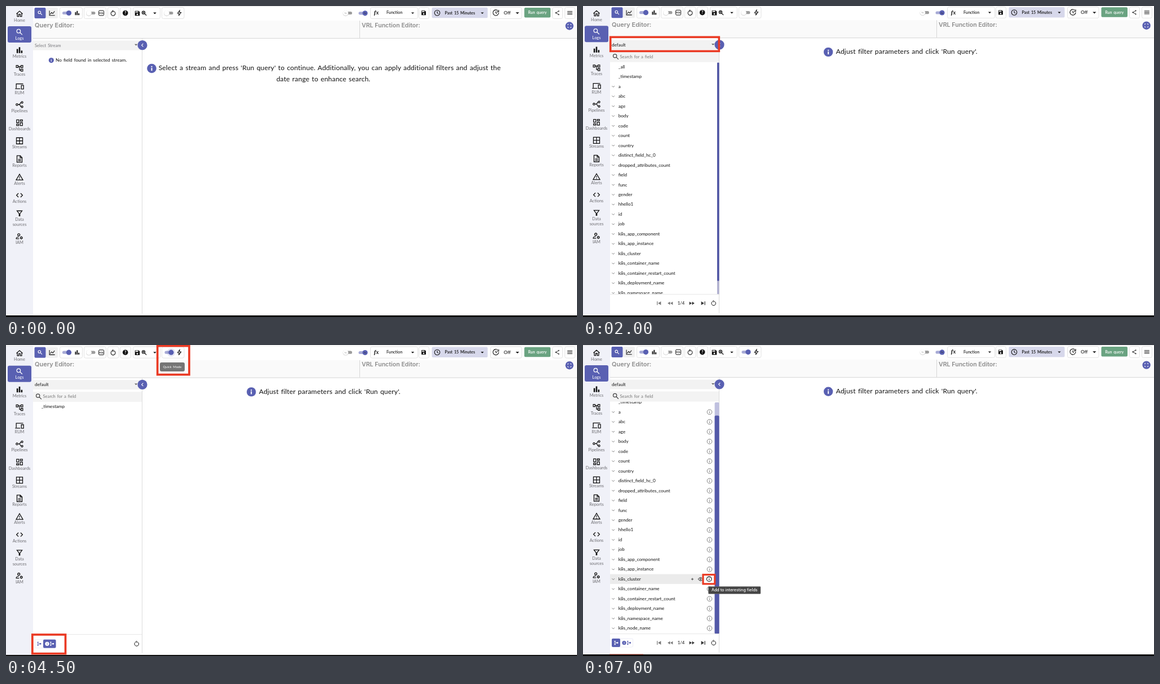
Recreate the animation shown at these times as an HTML page. Size 1013 px wide and 553 px high, loop 8000 ms.

```html
<!DOCTYPE html>
<html lang="en">
<head>
<meta charset="utf-8">
<title>Log search</title>
<style>
html, body { margin: 0; width: 100%; height: 100%; overflow: hidden; background: #fff; }
svg { display: block; width: 1013px; height: 553px; font-family: Lato, "Noto Sans", sans-serif; word-spacing: .06em; }
#page { animation: nudge 8s step-end infinite; }
.bar { animation: bar 8s step-end infinite; }
.empty { animation: empty 8s step-end infinite; }
.ready { animation: ready 8s step-end infinite; }
.stream { animation: stream 8s step-end infinite; }
.quick { animation: quick 8s step-end infinite; }
.fields { animation: fields 8s step-end infinite; }
.off { animation: off 8s step-end infinite; }
.on { animation: on 8s step-end infinite; }
@keyframes nudge {
  0% { transform: translateY(0); }
  6.25% { transform: translateY(-.8px); }
  37.5% { transform: translateY(.7px); }
  68.75%, 100% { transform: translateY(.1px); }
}
@keyframes bar { 0%, 68.75%, 100% { transform: none; } 37.5% { transform: translateY(.8px); } }
@keyframes empty { 0% { visibility: visible; } 6.25%, 100% { visibility: hidden; } }
@keyframes ready { 0% { visibility: hidden; } 6.25%, 100% { visibility: visible; } }
@keyframes stream { 0%, 37.5%, 100% { visibility: hidden; } 6.25% { visibility: visible; } }
@keyframes quick { 0%, 68.75%, 100% { visibility: hidden; } 37.5% { visibility: visible; } }
@keyframes fields { 0% { visibility: hidden; } 68.75%, 100% { visibility: visible; } }
@keyframes off { 0% { visibility: visible; } 37.5%, 100% { visibility: hidden; } }
@keyframes on { 0% { visibility: hidden; } 37.5%, 100% { visibility: visible; } }
</style>
</head>
<body>
<svg id="stage" viewBox="0 0 1013 553">
  <defs><clipPath id="listClip"><rect x="48" y="101" width="193" height="412"/></clipPath></defs>
  <g id="page"></g>
  <g id="marks"></g>
</svg>
<script>
const BLUE = '#5960b2', RED = '#ea3a24', INK = '#111', GREY = '#77777c', LINE = '#dcdcdc';
const page = document.getElementById('page'), marks = document.getElementById('marks');
let layer = page;

function el(tag, attrs, text) {
  const node = document.createElementNS('http://www.w3.org/2000/svg', tag);
  for (const k in attrs) node.setAttribute(k, attrs[k]);
  if (text) node.textContent = text;
  return layer.appendChild(node);
}
function group(attrs, draw) {
  const outer = layer;
  layer = el('g', attrs);
  draw();
  layer = outer;
}
const scene = (name, draw) => group({ class: name }, draw);
const box = (x, y, w, h, fill, rx = 0, more = {}) => el('rect', { x, y, width: w, height: h, fill, rx, ...more });
const frame = (x, y, w, h, stroke, sw, rx = 0) => box(x, y, w, h, 'none', rx, { stroke, 'stroke-width': sw });
const dot = (cx, cy, r, fill, more = {}) => el('circle', { cx, cy, r, fill, ...more });
const path = (d, fill, more = {}) => el('path', { d, fill, ...more });
// y is the middle of the line
const text = (x, y, s, size, fill = INK, more = {}) =>
  el('text', { x, y: y + size * .34, 'font-size': size, fill, ...more }, s);
const mid = { 'text-anchor': 'middle' };
const ring = (x, y, r) => `M${x - r} ${y}a${r} ${r} 0 1 1 ${2 * r} 0a${r} ${r} 0 1 1 ${-2 * r} 0`;

const lens = ring(9.5, 9.5, 5) + 'M13.5 13.5L19.5 19.5';
const lines = {
  home: 'M3.5 12L12 4.4l8.5 7.6M6 10.5V19h4v-6h4v6h4v-8.5',
  search: lens,
  zoom: lens + 'M9.5 7v5M7 9.5h5',
  tree: 'M3 4h5v6H3zM16 4h5v6h-5zM16 14h5v6h-5zM8 7h8M12 7v10h4',
  devices: 'M3 17V5h19M0 18.5h14M17 9h6v10h-6z',
  pipe: ring(5, 12, 2.6) + ring(19, 6, 2.4) + ring(19, 18, 2.4) + 'M8 12h3q2 0 3-3t3-3M11 12q2 0 3 3t3 3',
  tiles: 'M4 4h6v8H4zM14 4h6v4h-6zM14 12h6v8h-6zM4 16h6v4H4z',
  grid: 'M3.5 3.5h17v17h-17zM12 3v18M3 12h18',
  doc: 'M5 3h9l5 5v13H5zM13.5 3v5.5H19M8 13h8M8 17h8',
  alert: 'M12 4L21.3 20H2.7zM12 10v4M12 16v2',
  code: 'M9 6.7L3.7 12L9 17.3M15 6.7L20.3 12L15 17.3',
  funnel: 'M5 5h14l-6 8v6h-2v-6z',
  user: ring(10, 8, 3) + 'M11 19H3v-1c0-2.5 4-4 7-4' + ring(17, 16.5, 2.5) + 'M17 12.5v1.5M17 19v2M13.5 14.5l1.5 1M19 17.5l1.5 1M20.5 14.5l-1.5 1M15 17.5l-1.5 1',
  chart: 'M3.5 4v16H22M6 16l5-6l4 4l6-8',
  reset: 'M8 6.2A7.5 7.5 0 1 0 12 5M12.5 1.5L9 5l3.5 3.5',
  bolt: 'M13 3L6 13h5l-1 8l8-11h-5z',
  clock: ring(12, 12, 8.8) + 'M12 6.5v5.5l4 2.5',
  update: 'M18.5 5.6A9 9 0 1 0 21 12M21 3v6h-6M12 7.5v5l3.5 2',
  share: 'M18 5L6 12l12 7' + ring(18, 5, 1.5) + ring(6, 12, 1.5) + ring(18, 19, 1.5),
  menu: 'M3 7h18M3 12h18M3 17h18',
  full: 'M5 9V5h4M15 5h4v4M19 15v4h-4M9 19H5v-4',
  bars: 'M6 9v11M12 4v16M18 13v7',
  info: ring(12, 12, 9) + 'M12 7v2M12 11v6',
  eye: 'M2 12q10-14 20 0q-10 14-20 0' + ring(12, 12, 2.5),
  plus: 'M12 6v12M6 12h12',
  down: 'M6 9l6 6l6-6',
  left: 'M15 6l-6 6l6 6'
};
const solids = {
  save: 'M3 3h14l4 4v14H3zM5 5v4h10V5z' + ring(12, 16, 3),
  first: 'M4 5h2.5v14H4zM19 5v14L8 12z',
  last: 'M20 5h-2.5v14H20zM5 5v14l11-7z',
  back: 'M11 6v12l-9-6zM21 6v12l-9-6z',
  next: 'M13 6v12l9-6zM3 6v12l9-6z',
  caret: 'M5 9h14l-7 7z',
  schema: 'M3 2h6v5H3zM3 9.5h6v5H3zM3 17h6v5H3zM14 8.5h8v7h-8zM5 7h2v10H5zM9 11h5v2H9z'
};
function icon(name, x, y, size, color = INK, sw = 2) {
  const k = size / 24, transform = `translate(${x - size / 2} ${y - size / 2}) scale(${k})`;
  if (solids[name]) path(solids[name], color, { transform, 'fill-rule': 'evenodd' });
  else path(lines[name], 'none', { transform, stroke: color, 'stroke-width': sw });
}
function toggle(x, y, on, mark) {
  box(x, y - 2.6, 15, 5.2, on ? '#a8abd6' : '#9c9c9c', 2.6);
  const cx = on ? x + 11.5 : x + 3.5;
  if (!on) dot(cx, y + .5, 4.9, '#ccc');
  dot(cx, y, 4.6, on ? BLUE : '#fff');
  if (mark) text(cx, y, mark, 4.5, on ? '#222' : '#999', mid);
}
function infoDot(x, y, r) {
  dot(x, y, r, BLUE);
  box(x - r * .12, y - r * .5, r * .24, r * .24, '#fff');
  box(x - r * .12, y - r * .12, r * .24, r * .62, '#fff');
}

// Side menu
box(0, 0, 48, 553, '#f0f1f8');
box(3, 36, 42, 29, BLUE, 3);
[['home', 'Home'], ['search', 'Logs'], ['bars', 'Metrics'], ['tree', 'Traces'], ['devices', 'RUM'],
 ['pipe', 'Pipelines'], ['tiles', 'Dashboards'], ['grid', 'Streams'], ['doc', 'Reports'], ['alert', 'Alerts'],
 ['code', 'Actions'], ['funnel', 'Data|sources'], ['user', 'IAM']].forEach(([pic, label], i) => {
  const y = 14 + 32.25 * i + (i > 11 ? 8.3 : 0), active = i === 1;
  icon(pic, 24, y, 15.5, active ? '#fff' : INK, pic === 'bars' ? 4 : 2);
  label.split('|').forEach((s, n) => text(24, y + 11 + 8.6 * n, s, 7.4, active ? '#fff' : GREY, { ...mid, 'font-weight': 500 }));
});

// Editors
box(48, 26, 965, 31.5, '#fafafa');
box(48, 57, 965, 1, '#d6d6d6');
box(627, 26, 1, 31, '#d6d6d6');
const title = { 'font-family': 'Inter, sans-serif', 'font-weight': 600, 'word-spacing': 0 };
text(51, 34, 'Query Editor:', 11, '#8c8c8c', title);
text(631, 34, 'VRL Function Editor:', 10.6, '#8c8c8c', title);
dot(999.6, 35.5, 7.2, BLUE);
icon('full', 999.6, 35.5, 10, '#fff', 2.2);

// Toolbar
box(0, 0, 1013, 1, '#e4e4e4');
box(71, 3, 21, 19, '#f0f0f0', 2);
box(50.5, 3, 20, 19, BLUE, 2);
icon('search', 60.5, 12.5, 11, '#fff', 2.4);
icon('chart', 81.5, 12.5, 12.5);
[[95.5, 40], [138.5, 39], [180.5, 19.5], [202.5, 19], [225.5, 48], [276.5, 39.5], [646.5, 84], [732.5, 18],
 [859.5, 55.5], [969.5, 18], [991.5, 18]].forEach(([x, w]) => frame(x, 2.5, w, 20, '#e2e2e2', 1, 3));
toggle(100, 12.5, true);
icon('bars', 126.3, 12.5, 11.5, INK, 4);
toggle(143.5, 12.5, false);
frame(164.6, 8.1, 9, 8.8, INK, 1, 1.5);
text(169.1, 12.4, 'SQL', 4.2, INK, { ...mid, 'font-weight': 700 });
icon('reset', 190, 13, 12.5);
dot(211.7, 12.5, 4.8, INK);
text(211.7, 12.6, '?', 7.5, '#fff', { ...mid, 'font-weight': 700 });
icon('save', 233, 13, 11.5);
icon('zoom', 245.3, 13, 12.5, INK, 2.3);
icon('caret', 264, 12.8, 9.5);
scene('off', () => toggle(281.5, 12.5, false));
scene('on', () => toggle(281.5, 12.5, true));
icon('bolt', 307.5, 12.5, 12.5);
toggle(599, 12.5, false, 'fx');
toggle(625.5, 12.8, true, 'fx');
text(652.8, 11.8, 'fx', 10.5, INK, { 'font-family': '"Liberation Serif", serif', 'font-style': 'italic', 'font-weight': 700 });
text(675, 12, 'Function', 7.3, INK, { 'font-weight': 500 });
icon('caret', 721.5, 12.5, 9);
icon('save', 741, 12.3, 10.5);
box(755.5, 2.8, 99, 18.5, '#d7d8eb', 2);
icon('clock', 765, 12.3, 13);
text(778.5, 12.1, 'Past 15 Minutes', 7.2, INK, { 'font-weight': 600 });
icon('caret', 845, 12.5, 9);
icon('update', 869, 12, 13.5);
text(883, 12, 'Off', 8.4, INK, { 'font-weight': 500 });
icon('caret', 907.3, 12.5, 10.5);
box(919.5, 3, 46.5, 17.5, '#6aa381', 2);
text(942.7, 12, 'Run query', 7.1, '#fff', { ...mid, 'font-weight': 600 });
icon('share', 978, 12.2, 10.5);
icon('menu', 1000.3, 12.2, 12);

// Field panel
box(241, 58, 1, 489, LINE);
box(48, 61.5, 193, 17, '#f2f2f2');
icon('caret', 230.7, 69, 9.5, '#666');
scene('empty', () => {
  text(51, 70, 'Select Stream', 7.6, GREY);
  infoDot(80.3, 96.6, 4.6);
  text(88, 96.5, 'No field found in selected stream.', 8.25, INK);
});
scene('ready', () => {
  text(51, 70, 'default', 8, INK);
  box(48, 82.5, 193, 18, '#f3f3f3');
  icon('search', 58.2, 91, 15, '#444');
  text(65.5, 91, 'Search for a field', 7.6, '#777');
});
dot(242, 69.7, 8.6, BLUE);
icon('left', 242, 69.7, 11, '#fff', 2.4);

// Messages
const message = (x, y, s) => text(x, y, s, 12.1, INK, { ...mid, 'letter-spacing': '.0125em' });
scene('empty', () => {
  infoDot(258.5, 111, 8.3);
  message(574.2, 110.2, "Select a stream and press 'Run query' to continue. Additionally, you can apply additional filters and adjust the");
  message(563, 130.2, 'date range to enhance search.');
});
scene('ready', () => {
  infoDot(435.2, 82.7, 8.2);
  message(574.2, 82, "Adjust filter parameters and click 'Run query'.");
});

const names = ('_all _timestamp a abc age body code count country distinct_field_hc_0 dropped_attributes_count field func gender ' +
  'hhello1 id job k8s_app_component k8s_app_instance k8s_cluster k8s_container_name k8s_container_restart_count ' +
  'k8s_deployment_name k8s_namespace_name k8s_node_name').split(' ');
const rowText = (s, y) => text(62.7, y, s, 8.15, INK);
const list = (top, info) => group({ 'clip-path': 'url(#listClip)' }, () => names.forEach((s, i) => {
  const y = top + 17.48 * i, hover = info && s === 'k8s_cluster';
  if (hover) box(48, y - 8.7, 185, 17.4, '#ebebeb');
  rowText(s, y);
  if (i > 1) {
    icon('down', 53.7, y + .2, 9, '#555');
    if (info && !hover) icon('info', 224.5, y + .2, 11.5, '#666', 1.7);
  }
  if (hover) {
    icon('plus', 194, y + .2, 8.5);
    icon('eye', 208.5, y + .2, 10, INK, 2.4);
  }
}));
const pager = y => {
  box(48, 513, 193, 1, '#e6e6e6');
  [['first', 135, '#777'], ['back', 155, '#777'], ['next', 193, '#333'], ['last', 213, '#333']]
    .forEach(([pic, x, color]) => icon(pic, x, y, 11.5, color));
  text(174, y, '1/4', 7.8, INK, mid);
  icon('reset', 231.7, y, 12);
};
const modes = (y, second) => {
  frame(51.5, y - 7.5, 37, 15, '#dfe0f0', .6, 2);
  box(second ? 66 : 51, y - 7.5, second ? 22.5 : 15, 15, BLUE, 2);
  const [a, b] = second ? [BLUE, '#fff'] : ['#fff', BLUE];
  const behind = second ? BLUE : '#fff';
  icon('schema', 58.8, y, 8.5, a);
  dot(73, y, 3.6, b);
  box(72.6, y - 2, .9, 1, behind);
  box(72.6, y - .5, .9, 2.4, behind);
  icon('schema', 81.5, y, 8.5, b);
};

scene('stream', () => {
  list(108.8, false);
  box(238, 101.5, 3.5, 412, '#b0b0d0');
  box(238, 101.5, 3.5, 388, '#4f55a4', 1);
  pager(529.3);
});
scene('quick', () => {
  rowText('_timestamp', 108.6);
  box(48, 513.5, 193, 1, '#e6e6e6');
  modes(530.6, true);
  icon('reset', 231.7, 530.6, 12);
  dot(293, 12.5, 7.5, BLUE, { opacity: .15 });
  box(273, 30.3, 44, 16, '#757575', 3);
  text(295, 38, 'Quick Mode', 5.95, '#fff', mid);
});
scene('fields', () => {
  list(83.9, true);
  box(233.6, 102, 8, 412, '#bfc0df', 2);
  box(233.6, 125.5, 8, 388.5, '#5258a8', 2);
  pager(529.5);
  modes(529.5, false);
});

// Highlights
layer = marks;
box(0, 550.2, 1013, 4, '#000', 0, { class: 'bar' });
scene('stream', () => frame(48.7, 55.3, 192.6, 25, RED, 3.6));
scene('quick', () => {
  frame(268.7, 1.7, 56.3, 51, RED, 3.7);
  frame(46.8, 515, 58.7, 33.7, RED, 3.7);
});
scene('fields', () => {
  box(47, 549.6, 60, 1, '#a3301f');
  box(213, 408.4, 20.8, 16.4, '#fff', 0, { stroke: RED, 'stroke-width': 3.2 });
  icon('info', 223.8, 416.2, 11.5, INK, 2.2);
  box(222.5, 429.6, 92.5, 12.8, '#454545', 1, { stroke: '#777', 'stroke-width': .5 });
  text(268.8, 436, 'Add to interesting fields', 7.2, '#fff', { ...mid, 'font-family': 'Inter, sans-serif', 'font-weight': 500, 'word-spacing': 0 });
});
</script>
</body>
</html>
```
